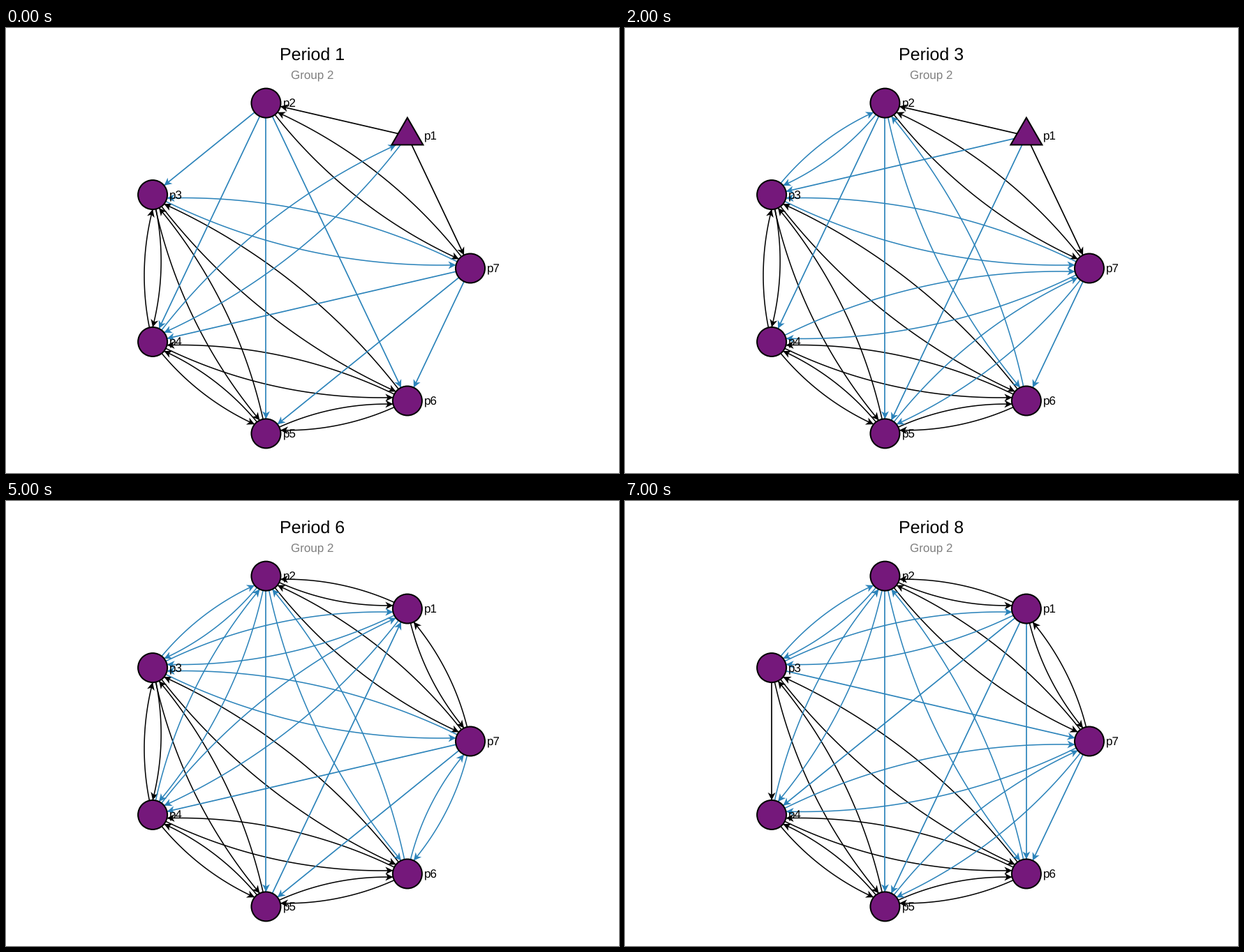
Recreate the animation shown at these times as a matplotlib script. Size 878 by 638 pixels, loop 8000 ms.

```python
import numpy as np
import matplotlib.pyplot as plt
from matplotlib.animation import FuncAnimation
from matplotlib.patches import Circle, Polygon

W, H, DPI = 878, 638, 64           # a power of two keeps the size exact
PT = 72 / DPI                      # points per pixel
PURPLE, BLUE, BLACK, GRAY = "#75187b", "#2b83ba", "black", "#808080"
RADIUS = 21

plt.rcParams["font.family"] = "Liberation Sans"
plt.rcParams["text.hinting"] = "none"

# Seven players on a slightly squeezed ring, p7 at three o'clock.
NODES = {}
for k in range(1, 8):
    a = 2 * np.pi * k / 7
    NODES[k] = np.array([425.7 + 239.3 * np.cos(a), 344.5 - 243 * np.sin(a)])

TEAM = {1, 2, 7}

# Per period: mutual links, one-way links.
PERIODS = [
    ("27 34 35 36 45 46 56 14 37", "12 17 23 24 25 26 74 75 76"),
    ("12 17 27 34 35 36 45 56 23 14 47 67", "64 24 25 26 31 37 57"),
    ("27 34 35 36 45 46 56 23 26 37 47 57", "12 17 24 25 13 15 76"),
    ("12 17 27 34 35 36 46 56 23 37 47 57 67", "54 24 25 26 13 15"),
    ("12 17 27 34 35 36 46 56 23 24 37 47 67", "54 13 25 26 51 75"),
    ("12 17 27 34 35 36 45 46 56 23 24 13 14 26 37 67", "25 51 74 75"),
    ("12 17 27 34 35 45 46 56 23 13 26 14 37 67", "63 24 25 51 61 74"),
    ("12 17 27 35 36 45 46 56 23 13 24 26 47 57", "34 25 14 15 16 37 76"),
]
TRIANGLE_PERIODS = {0, 2}

fig = plt.figure(figsize=(W / DPI, H / DPI), dpi=DPI, facecolor="white")
ax = fig.add_axes([0, 0, 1, 1])


def link_path(src, dst, curved):
    """Points from the centre of src to the rim of dst."""
    a, b = NODES[src], NODES[dst]
    d = b - a
    u = d / np.hypot(*d)
    end = b - u * RADIUS
    if not curved:
        return np.array([a, end])
    # Circular arc whose radius is twice its chord.
    chord = np.hypot(*(end - a))
    half = np.arcsin(0.25)
    t = np.linspace(-half, half, 50)[:, None]
    along = chord / 2 + 2 * chord * np.sin(t)
    off = 2 * chord * (np.cos(t) - np.cos(half))
    side = -1 if d[0] * d[1] > 1 else 1
    return a + along * u + off * side * np.array([u[1], -u[0]])


def draw_link(src, dst, curved):
    color = BLACK if (src in TEAM) == (dst in TEAM) else BLUE
    pts = link_path(src, dst, curved)
    ax.plot(pts[:, 0], pts[:, 1], color=color, zorder=1,
            lw=(1.55 if curved else 1.7) * PT, solid_capstyle="butt")
    u = pts[-1] - pts[-2]
    u = u / np.hypot(*u)
    n = np.array([-u[1], u[0]])
    tip = pts[-1]
    head = [tip, tip - 11 * u + 5.5 * n, tip - 7.8 * u, tip - 11 * u - 5.5 * n]
    ax.add_patch(Polygon(head, fc=color, ec="none", zorder=1))


def draw_node(k, triangle):
    x, y = NODES[k]
    style = dict(fc=PURPLE, ec=BLACK, lw=2 * PT, zorder=3)
    if triangle:
        a = np.radians([-90, 30, 150])
        corners = np.column_stack([x + 26 * np.cos(a), y + 26 * np.sin(a)])
        ax.add_patch(Polygon(corners, joinstyle="miter", **style))
    else:
        ax.add_patch(Circle((x, y), RADIUS, **style))
    write(x + 24.3, y + 6, f"p{k}", 17, ha="left")


def write(x, y, text, px, color=BLACK, ha="center"):
    ax.text(x, y, text, fontsize=px * PT, color=color, ha=ha,
            va="baseline", zorder=4)


def draw(i):
    ax.clear()
    ax.set_xlim(0, W)
    ax.set_ylim(H, 0)
    ax.axis("off")
    mutual, single = PERIODS[i]
    for s, t in mutual.split():
        draw_link(int(s), int(t), True)
        draw_link(int(t), int(s), True)
    for s, t in single.split():
        draw_link(int(s), int(t), False)
    for k in NODES:
        draw_node(k, k == 1 and i in TRIANGLE_PERIODS)
    write(439, 46, f"Period {i + 1}", 25)
    write(439, 73, "Group 2", 17, GRAY)
    return []


anim = FuncAnimation(fig, draw, frames=len(PERIODS), interval=1000,
                     repeat=True, repeat_delay=0)
plt.show()
```
